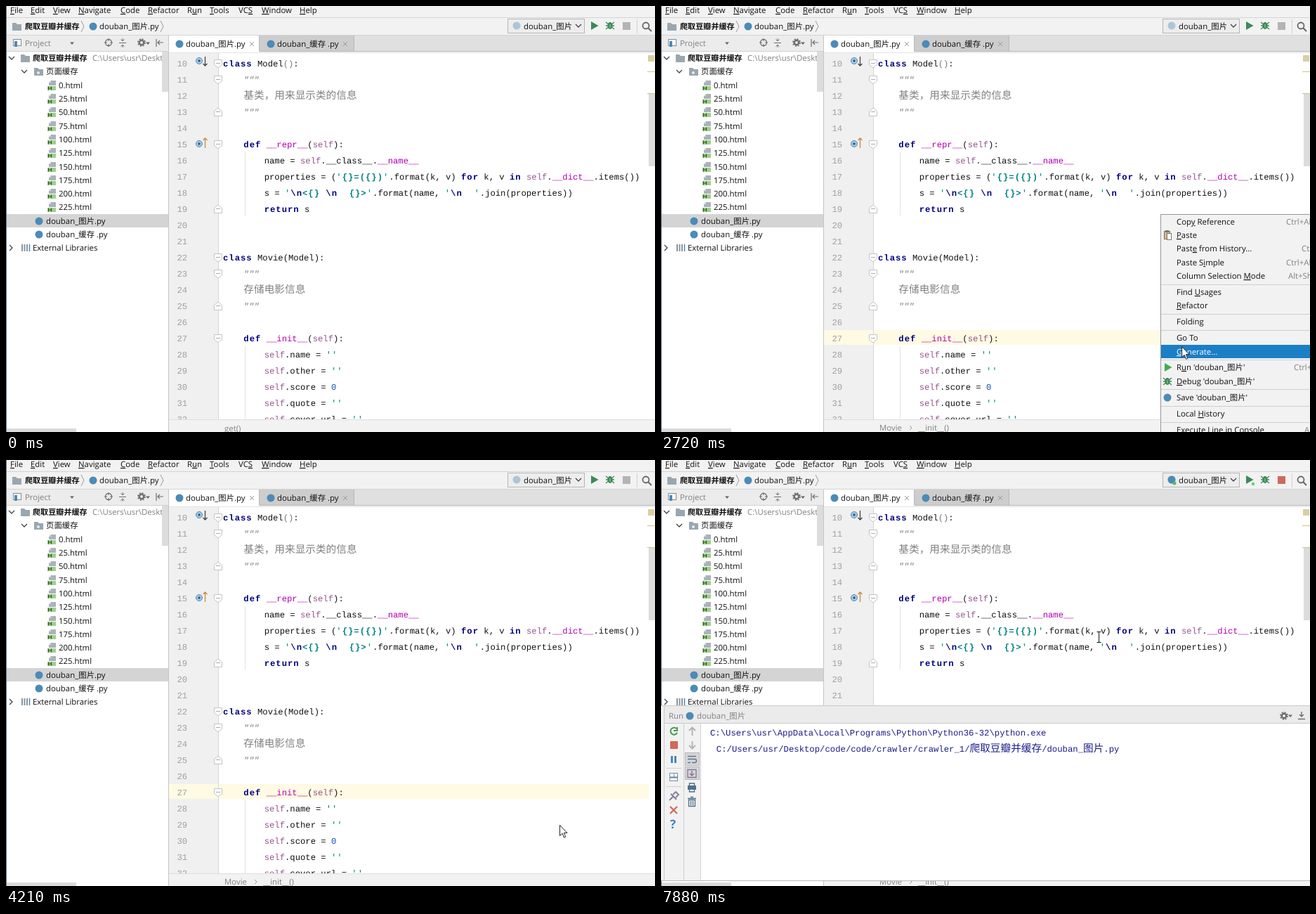
An HTML page that plays this animation: 924x606 px, repeating every 8 s.

```html
<!DOCTYPE html>
<html lang="zh-CN">
<head>
<meta charset="utf-8">
<title>IDE</title>
<style>
html, body { margin: 0; width: 100%; height: 100%; overflow: hidden; background: #fff; }
svg { display: block; }
text { font: 11.4px "Open Sans", "Noto Sans CJK SC", "Noto Sans CJK", sans-serif; fill: #111; white-space: pre; text-rendering: geometricPrecision; }
.code { font: 12.22px "Liberation Mono", "Noto Sans CJK SC", monospace; }
.cjk { font: 300 14.66px "Noto Sans CJK SC", "Noto Sans CJK", sans-serif; }
.bold { font-weight: bold; font-size: 11.1px; }
.dim { fill: #808080; }
.num { fill: #a0a0a0; }
.white { fill: #fff; }
.out { font-size: 12.28px; fill: #1c1c8c; }
.k, .s, .e { font-weight: bold; }
.k, .s, .e, .q { letter-spacing: 1px; }
.k, .e { fill: #000080; }
.s, .q { fill: #008080; }
.m { fill: #b200b2; }
.f { fill: #94558d; }
.n { fill: #1750c0; }
.d { fill: #808080; font-style: italic; }
.p { fill: #777; }
.u { text-decoration: underline; }
</style>
</head>
<body>
<script>
const LOOP = 8000;
let css = '', groups = 0;
const pct = t => t / LOOP * 100 + '%';
const esc = s => s.replace(/&/g, '&amp;').replace(/</g, '&lt;');

// Group that is visible only between two times.
function during(from, to, body) {
  const name = 'show' + groups++;
  css += `@keyframes ${name}{0%{visibility:hidden}${pct(from)}{visibility:visible}${pct(to)}{visibility:hidden}}`;
  return `<g style="animation:${name} ${LOOP}ms step-end infinite">${body}</g>`;
}
function travel(points, body) {
  const steps = points.map(([t, x, y]) => `${pct(t)}{transform:translate(${x}px,${y}px)}`);
  css += `@keyframes travel{${steps.join('')}}`;
  return `<g style="animation:travel ${LOOP}ms linear infinite">${body}</g>`;
}

const rect = (x, y, w, h, fill, extra = '') => `<rect x="${x}" y="${y}" width="${w}" height="${h}" fill="${fill}" ${extra}/>`;
const line = (d, color = '#6e6e6e', w = 1) => `<path d="${d}" fill="none" stroke="${color}" stroke-width="${w}"/>`;
const shape = (d, fill) => `<path d="${d}" fill="${fill}"/>`;
const dot = (x, y, r, fill, extra = '') => `<circle cx="${x}" cy="${y}" r="${r}" fill="${fill}" ${extra}/>`;
const at = (x, y, body) => `<g transform="translate(${x} ${y})">${body}</g>`;
// Text centred on the line y.
const label = (x, y, s, cls = '') => `<text x="${x}" y="${y + 4}" class="${cls}">${esc(s)}</text>`;
const rich = s => esc(s)
  .replace(/~(\w)([^~]+)~/g, '<tspan class="$1">$2</tspan>')
  .replace(/[\u3000-\u9fff\uff0c]+/g, '<tspan class="cjk">$&</tspan>');
const code = (x, y, s, cls = '') => `<text x="${x}" y="${y + 4}" class="code ${cls}">${rich(s)}</text>`;

const py = (x, y) => dot(x, y, 5.5, '#4b8bb8');
const folder = (x, y) => shape(`M${x} ${y - 5}h5l2 2h6v9h-13z`, '#9aa7b0');
const down = (x, y) => line(`M${x - 4} ${y - 2}l4 4l4 -4`, '#444', 1.3);
const right = (x, y) => line(`M${x - 2} ${y - 4}l4 4l-4 4`, '#444', 1.3);
const crumb = x => line(`M${x - 2} 21l4 8l-4 8`, '#999');
const drop = (x, y) => shape(`M${x - 3} ${y - 1.5}h6l-3 3.5z`, '#666');
const gear = (x, y) => dot(x, y, 3.2, 'none', 'stroke="#6e6e6e" stroke-width="2.4"') +
  dot(x, y, 5, 'none', 'stroke="#6e6e6e" stroke-width="1.8" stroke-dasharray="2 1.93"');
const play = (x, y, fill) => shape(`M${x - 5} ${y - 6}l10.5 6l-10.5 6z`, fill);
const bug = (x, y, c) => at(x, y, line('M-6 -5l12 10M-6 5l12 -10M-6 0h12', c, 1.3) +
  `<ellipse rx="3.6" ry="5" fill="${c}"/>` + line('M0 -2v5', '#fff', .6));
const htmlIcon = y => at(59, y, shape('M5 -7h7v7h-10v-4z', '#a9b3ba') + shape('M2 -4l3 -3v3z', '#d5dade') +
  rect(0, 1, 12, 6, '#9fd089') + line('M1.5 1.500v5M5.500 1.500v5M1.500 4h4', '#2e5a24', 1.2));

function topBars() {
  const menu = [[6, 'File'], [35, 'Edit'], [67, 'View'], [103, 'Navigate'], [163, 'Code'], [202, 'Refactor'],
    [258, 'Run'], [290, 'Tools'], [331, 'VCS'], [364, 'Window'], [418, 'Help']];
  const mnemonic = { Run: 1, VCS: 2 };
  const items = menu.map(([x, s]) => {
    const i = mnemonic[s] || 0;
    return `<text x="${x}" y="10">${s.slice(0, i)}<tspan class="u">${s[i]}</tspan>${s.slice(i + 1)}</text>`;
  }).join('');
  return rect(0, 0, 924, 66, '#f2f2f2') + items + line('M0 16.5H924M0 41.5H924', '#d4d4d4') +
    folder(9, 29) + label(27, 29, '爬取豆瓣并缓存', 'bold') + crumb(109) +
    py(124, 29) + label(133, 29, 'douban_图片.py') + crumb(222) +
    rect(714.5, 18.5, 109, 20, '#ededed', 'stroke="#b5b5b5"') +
    `<g opacity=".4">${py(727, 28)}</g>` + label(737, 29, 'douban_图片') + down(815, 28) +
    play(838, 28, '#3b8a58') + bug(860, 28, '#3b8a58') + rect(878, 23, 11, 11, '#b4b4b4') +
    line('M898.5 19v20', '#d0d0d0') + dot(911, 28, 4.5, 'none', 'stroke="#666" stroke-width="1.8"') + line('M914 31l5 5', '#666', 2);
}

function projectPane() {
  let s = rect(0, 42, 231, 22, '#ececec') + line('M0 64.5H231', '#d0d0d0') + rect(1, 65, 230, 541, '#fff') +
    rect(10.5, 47.5, 11, 9, '#fff', 'stroke="#7f8b91"') + rect(12, 50, 4, 8, '#4a88b5') + label(27, 53, 'Project', 'dim') + drop(94, 53) +
    dot(146, 52, 4.5, 'none', 'stroke="#6e6e6e" stroke-width="1.3"') + line('M146 46v4M146 54v4M140 52h4M148 52h4') +
    line('M161 52.5h10M166 46v4M166 55v4M163.5 47.5l2.5 2.5l2.5 -2.5M163.5 57.5l2.5 -2.5l2.5 2.5') +
    gear(193, 52) + drop(202, 53) + line('M214 47v11M216 52h8M219 49l-3 3l3 3', '#6e6e6e', 1.2) +
    rect(1, 296, 230, 19, '#d4d4d4') +
    down(8, 74) + folder(21, 74) + label(38, 74, '爬取豆瓣并缓存', 'bold') + label(123, 74, 'C:\\Users\\usr\\Deskt', 'dim') +
    rect(231, 65, 10, 20, '#f0f0f0') + rect(222, 65, 9, 57, '#dcdcdc') +
    down(26, 93) + folder(40, 93) + dot(46, 95, 2, '#e6eaed') + label(57, 93, '页面缓存');
  for (let i = 0; i < 10; i++) {
    const y = 112.7 + i * 19.3;
    s += htmlIcon(Math.round(y)) + label(75, y, i * 25 + '.html');
  }
  return s + py(47, 306) + label(57, 306, 'douban_图片.py') + py(47, 325) + label(57, 325, 'douban_缓存 .py') +
    right(7, 344) + line('M23 339v10M26.5 339v10M30 339v10', '#8a969e', 2) + line('M33.5 339v10', '#4a88b5', 1.5) +
    label(38, 344, 'External Libraries') + rect(0, 601, 100, 5, '#dadada') +
    line('M.5 0V606', '#66788a') + line('M231.5 42V606', '#c4c4c4');
}

const source = String.raw`~kclass~ Model~p()~:
    ~d"""~
    基类，用来显示类的信息
    ~d"""~

    ~kdef~ ~m__repr__~(~fself~):
        name = ~fself~.__class__.~m__name__~
        properties = (~q'~~s{}=({})~~q'~.format(k, v) ~kfor~ k, v ~kin~ ~fself~.~m__dict__~.items())
        s = ~q'~~e\n~~s<{} ~~e\n~~s  {}>~~q'~.format(name, ~q'~~e\n~~s  ~~q'~.join(properties))
        ~kreturn~ s


~kclass~ Movie(Model):
    ~d"""~
    存储电影信息
    ~d"""~

    ~kdef~ ~m__init__~(~fself~):
        ~fself~.name = ~q''~
        ~fself~.other = ~q''~
        ~fself~.score = ~n0~
        ~fself~.quote = ~q''~
        ~fself~.cover_url = ~q''~`.split('\n');
const rowY = n => 82 + (n - 10) * 23;

function editor() {
  const fold = (n, up) => at(302, rowY(n), `<path d="M-5.5 -5.5h11v7l-5.5 4.5l-5.5 -4.5z" fill="#fff" stroke="#c3c3c3" ${up ? 'transform="scale(1 -1)"' : ''}/>` + line('M-3 -.5h6', '#aaa'));
  let s = rect(232, 42, 692, 23, '#e0e0e0') + rect(232, 42, 128, 24, '#fff') + rect(361, 42, 134, 22, '#cdcdcd') +
    line('M360.5 42V64M495.5 42V64M361 64.5H924', '#b8b8b8') +
    py(247, 54) + label(256, 54, 'douban_图片.py') + py(377, 54) + label(386, 54, 'douban_缓存 .py') +
    line('M347 51l6 6m0 -6l-6 6M480 51l6 6m0 -6l-6 6', '#999') +
    rect(232, 66, 692, 523, '#fff') + rect(232, 66, 70, 523, '#f0f0f0') + line('M232 66.5H924', '#e4e4e4') +
    during(1540, LOOP, rect(232, 461, 683, 21, '#fffae3')) +
    line('M302.5 67V588', '#d6d6d6') + line('M340.5 208V298M340.5 484V588', '#e2e2e2');
  source.forEach((text, i) => {
    const n = i + 10;
    s += code(243.5, rowY(n), '' + n, 'num') + code(309, rowY(n), text, /^ +[\u3000-\u9fff]/.test(text) ? 'dim' : '');
  });
  [10, 11, 15, 22, 23, 27].forEach(n => s += fold(n));
  [13, 19, 25].forEach(n => s += fold(n, true));
  [78, 196].forEach(y => s += dot(275, y, 4.5, '#a9cbe6', 'stroke="#4a88b5"') + dot(275, y, 1.7, '#24567c'));
  return s + line('M283.5 72v13M280.5 82l3 3l3 -3', '#444', 1.3) + line('M283.5 202v-14M280.5 191l3 -3l3 3', '#c98a3c', 1.3) +
    rect(914, 70, 9, 9, '#d9cfa0') + line('M913 93.5h11M913 124.5h11', '#d3c47e') + rect(915, 125, 9, 103, '#dcdcdc') +
    during(1540, 2320, line('M481 463V482', '#000', 1.5)) +
    rect(232, 588, 692, 18, '#f2f2f2') + line('M232 588.5H924', '#dedede') +
    during(0, 1820, label(311, 601, 'get()', 'dim')) +
    during(1820, LOOP, label(311, 600, 'Movie', 'dim') + line('M354 597l3 3l-3 3', '#999') + label(366, 600, '__init__()', 'dim'));
}

function menuRow(y, text, keys, keyX, cls = '') {
  const marked = esc(text.replace('&', '|')).replace(/\|(.)/, '<tspan class="u">$1</tspan>');
  return `<text x="734" y="${y + 4}" class="${cls}">${marked}</text>` + (keys ? label(keyX, y, keys, cls || 'dim') : '');
}

function popup() {
  const run = [514, "R&un 'douban_图片'", 'Ctrl+Shift+F10', 901];
  const generate = [492, '&Generate...'], debug = [534, "&Debug 'douban_图片'"];
  const rows = [[307, 'Cop&y Reference', 'Ctrl+Alt+Shift+C', 890], [326, '&Paste'],
    [345, 'Past&e from History...', 'Ctrl+Shift+V', 912], [365, 'Paste S&imple', 'Ctrl+Alt+Shift+V', 890],
    [384, 'Column Selection &Mode', 'Alt+Shift+Insert', 893], [407, 'Find &Usages'], [426, '&Refactor'],
    [449, 'Folding'], [472, 'Go To'], generate, run, debug, [557, "Save 'douban_图片'"],
    [580, 'Local &History'], [603, 'Execute Line in Console', 'Alt+Shift+E', 916]];
  const picked = (from, to, row) => during(from, to, rect(712, row[0] - 10, 212, 19, '#1b7fc6') +
    menuRow(row[0], row[1], row[2], row[3], 'white'));
  return during(2320, 4110, rect(711.5, 296.5, 220, 320, '#f2f2f2', 'stroke="#979797"') +
    rows.map(r => menuRow(...r)).join('') +
    [396, 438, 461, 503, 545, 569, 592].map(y => line(`M712 ${y}.5H924`, '#cfcfcf')).join('') +
    picked(2720, 2860, generate) + picked(2860, 3020, run) + picked(3020, 3450, debug) + picked(3450, 4110, run) +
    rect(716.5, 320.5, 8, 11, '#d8b78a', 'stroke="#8a6d45"') + rect(720.5, 323.5, 6, 9, '#fff', 'stroke="#777"') +
    rect(718, 319, 5, 3, '#777') + play(722, 514, '#3fae4f') + bug(721, 534, '#3b8a58') + py(721, 557));
}

function runPanel() {
  const tools = line('M22 382a5 5 0 1 0 1 6M23 380v5h-5', '#499c54', 2) + rect(13, 400, 11, 11, '#d0695c') +
    line('M15.5 421v10M20.5 421v10', '#4a88c0', 3) +
    rect(12.5, 445.5, 11, 11, '#fff', 'stroke="#7f8b91"') + line('M13 451.5h11', '#4a88b5', 2) + line('M18.5 446v5', '#7f8b91') +
    line('M12 484l5 -5M14 475l8 8M17 476l4 -4l4 4l-4 4', '#85779c', 1.8) +
    line('M13 493l10 10m0 -10l-10 10', '#d0695c', 2.2) + `<text x="13" y="524" style="font-size:17px;font-weight:700;fill:#3f83bd">?</text>` +
    line('M44.5 392v-11M40 385l4.5 -4.5l4.5 4.5M44.5 400v11M40 406l4.5 4.5l4.5 -4.5', '#b4b4b4', 2) +
    [416.5, 436.5].map(y => rect(34.5, y, 20, 18, '#d6d6d6', 'stroke="#b8b8b8"')).join('') +
    line('M38 421.5h12M38 425.5h10a2.5 2.5 0 0 1 0 5h-4M38 430.5h4', '#5c7894', 1.4) +
    line('M38 440.5h12v11h-12z', '#85779c', 1.3) + line('M44 442v7M41 446l3 3l3 -3', '#85779c', 1.5) +
    rect(38, 463, 12, 6, '#4f7288') + line('M40.5 463v-3h7v3M40.5 468v4h7v-4', '#4f7288', 1.4) +
    line('M39.5 483.5h9v9h-9zM38 481.5h12M42 479.5h4M42.5 485v6M45.5 485v6', '#4f7288', 1.3);
  return during(4480, LOOP, rect(0, 349, 924, 250, '#f2f2f2') + rect(5, 350, 919, 24, '#ebebeb') +
    line('M0 349.5H924M5 374.5H924', '#c9c9c9') + line('M4.5 350V598', '#c9c9c9') +
    label(11, 364, 'Run', 'dim') + py(41, 364) + label(51, 364, 'douban_图片', 'dim') +
    gear(887, 364) + drop(896, 364) + line('M912 358v7M909 362l3 3l3 -3M907 368.5h10', '#6e6e6e', 1.4) +
    rect(57, 375, 867, 223, '#fff') + line('M32.5 375V598M56.5 375V598', '#d0d0d0') +
    line('M8 438.5h21M8 464.5h21', '#d0d0d0') + line('M0 598.5H924', '#b9b9b9') + tools +
    py(727, 28) + dot(731, 33, 2.5, '#59b95c') + dot(843, 34, 2.2, '#59d95c') + rect(878, 23, 11, 11, '#d0695c')) +
    during(4620, LOOP, code(70, 388, 'C:\\Users\\usr\\AppData\\Local\\Programs\\Python\\Python36-32\\python.exe', 'out') +
      code(71.5, 411, ' C:/Users/usr/Desktop/code/code/crawler/crawler_1/爬取豆瓣并缓存/douban_图片.py', 'out'));
}

function pointer() {
  const beam = line('M-3 -7.5h2.5l.5 .5l.5 -.5h2.5M0 -7V7M-3 7.5h2.5l.5 -.5l.5 .5h2.5', '#111', 1.2);
  const arrow = '<path d="M.5 .5v15l3.5 -3.3l2.5 5.8l2.3 -1l-2.5 -5.5h4.7z" fill="#fff" stroke="#222"/>';
  const path = [[0, 831, 604], [500, 831, 602], [1170, 714.5, 480], [2050, 714, 479], [2320, 712, 479], [2600, 712, 479], [2720, 741, 484],
    [3130, 775, 540], [3270, 780, 537], [3480, 788, 523], [3820, 788, 520], [3970, 788, 519], [4479, 788, 519],
    [4480, 789, 514], [4720, 789, 514], [4890, 783.5, 500], [5630, 608, 317], [5750, 606, 300], [5880, 602, 288],
    [6170, 599, 355], [6290, 599, 355], [6390, 606, 330], [6500, 620, 285], [6600, 629, 258], [6800, 630, 249],
    [6900, 630, 249], [6980, 612, 300], [7050, 599, 351], [7190, 596, 360], [7400, 578, 386], [7660, 589, 335],
    [7720, 589, 335], [7800, 607, 292], [7880, 623.5, 252], [8000, 623.5, 252]];
  return travel(path, during(500, 2050, beam) + during(2050, 4480, arrow) + during(4480, LOOP, beam));
}

const stage = topBars() + projectPane() + editor() + popup() + runPanel() + pointer();
document.head.insertAdjacentHTML('beforeend', `<style>${css}</style>`);
document.body.innerHTML = `<svg width="924" height="606" viewBox="0 0 924 606">${stage}</svg>`;
</script>
</body>
</html>
```
